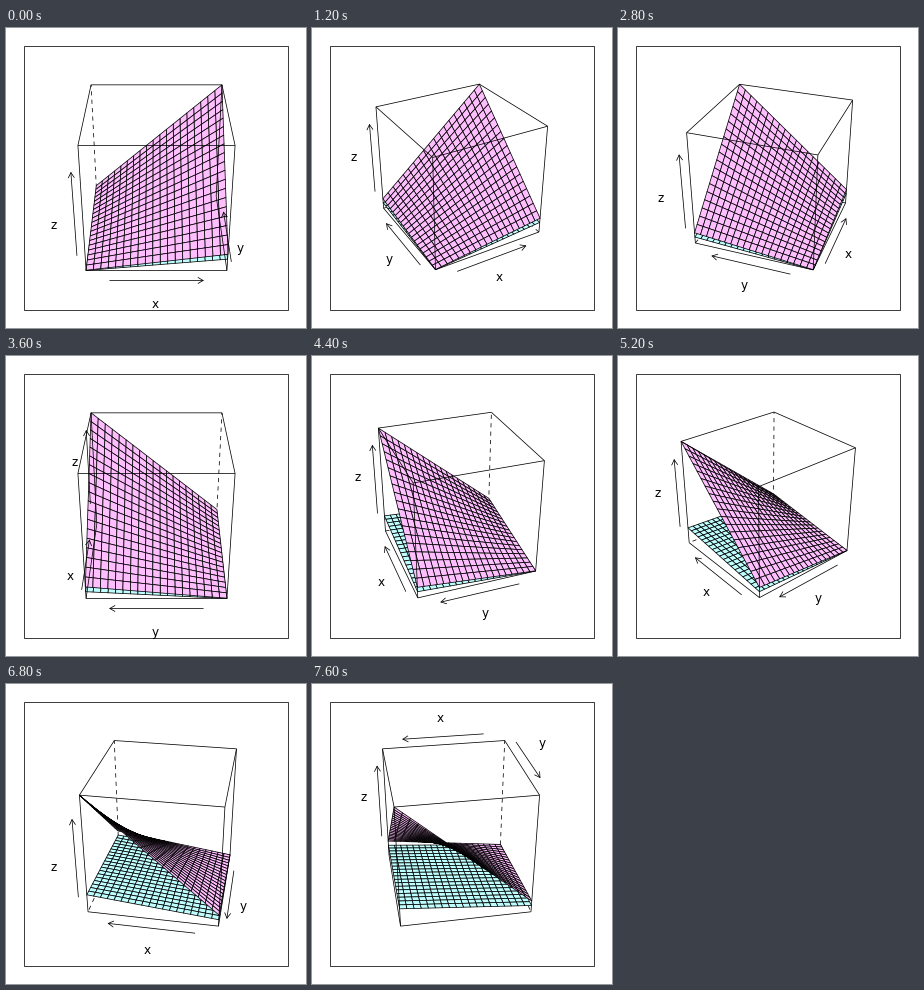
A matplotlib script for the animation above (8000 ms loop, 300 px wide and 300 px high).

```python
import itertools

import matplotlib.pyplot as plt
import numpy as np
from matplotlib.animation import FuncAnimation
from matplotlib.collections import LineCollection, PolyCollection
from matplotlib.patches import Rectangle

SIZE = 300
MIDDLE = 150.5              # centre of the panel
PANEL = 264
PX = 0.72                   # points per pixel at 100 dpi
LINE = 0.75 * PX
EYE = 5.0                   # viewing distance
TILT = np.radians(60)
BOX_SPAN = 185.6            # longest side of the projected box, in pixels
ZOOM = 0.8
STEP_DEG, FRAMES, INTERVAL = 10, 20, 400
CYAN, PINK = "#BFFFFF", "#FFBFFF"

# Two surfaces over a 20 x 20 grid: additive, and with an interaction term
N = 20
gx, gy = np.meshgrid(np.arange(1, N + 1), np.arange(1, N + 1), indexing="ij")
plane = 5.0 * gx + 3.0 * gy
twisted = plane + 2.0 * gx * gy
low, high = plane.min(), twisted.max()


def unit(v, lo, hi):
    return (v - lo) / (hi - lo) - 0.5


GRID_X, GRID_Y = unit(gx, 1, N), unit(gy, 1, N)
SURFACES = [np.stack([GRID_X, GRID_Y, unit(z, low, high)], axis=-1)
            for z in (plane, twisted)]

CORNERS = np.array(list(itertools.product((-0.5, 0.5), repeat=3)))
EDGES = [(a, b) for a, b in itertools.combinations(range(8), 2)
         if np.abs(CORNERS[a] - CORNERS[b]).sum() == 1]

# Hidden floor corner (x, y) -> side signs of the x, y and z axis arrows
# as (y, z), (x, z) and (x, y); ties go to the first entry.
AXIS_SIDES = {
    (-1, 1): ((-1, -1), (1, -1), (-1, -1)),
    (1, -1): ((1, -1), (-1, -1), (1, 1)),
    (1, 1): ((-1, -1), (-1, -1), (-1, 1)),
    (-1, -1): ((-1, 1), (-1, 1), (1, -1)),
}


def turn(points, angle):
    x, y = points[..., 0], points[..., 1]
    c, s = np.cos(angle), np.sin(angle)
    return x * c - y * s, x * s + y * c


def perspective(points, angle):
    x, y = turn(points, angle)
    z = points[..., 2]
    c, s = np.cos(TILT), np.sin(TILT)
    depth = EYE - (z * c - y * s)
    return np.stack([x, y * c + z * s], axis=-1) / depth[..., None]


def make_camera(angle):
    """Return a function from box coordinates to stage pixels."""
    flat = perspective(CORNERS, angle)
    lo, hi = flat.min(axis=0), flat.max(axis=0)
    scale = BOX_SPAN / (hi - lo).max()
    centre = (lo + hi) / 2 / ZOOM

    def camera(points):
        p = (perspective(np.asarray(points, float), angle) - centre) * scale
        return p * (1, -1) + MIDDLE

    return camera


def hidden_corner(angle):
    return max(AXIS_SIDES,
               key=lambda c: round(float(turn(np.array(c), angle)[1]), 6))


def quads(mesh):
    cells = np.stack([mesh[:-1, :-1], mesh[1:, :-1],
                      mesh[1:, 1:], mesh[:-1, 1:]], axis=2)
    return cells.reshape(-1, 4, mesh.shape[-1])


def draw_surfaces(camera, angle):
    x, y = turn(quads(SURFACES[0])[..., :2].mean(axis=1), angle)
    distance = np.hypot(x, y + EYE * np.sin(TILT))
    order = np.argsort(-distance, kind="stable")
    below, above = (quads(camera(s))[order] for s in SURFACES)
    cells = np.stack([below, above], axis=1).reshape(-1, 4, 2)
    ax.add_collection(PolyCollection(
        cells, facecolors=[CYAN, PINK] * len(order), edgecolors="black",
        linewidths=LINE, joinstyle="round", snap=False, zorder=2))


def draw_box(camera, corner):
    flat = camera(CORNERS)
    far = next(i for i, c in enumerate(CORNERS)
               if tuple(c * 2) == (*corner, -1))
    back = [flat[list(e)] for e in EDGES if far in e]
    front = [flat[list(e)] for e in EDGES if far not in e]
    style = dict(colors="black", linewidths=LINE, snap=False)
    ax.add_collection(LineCollection(back, linestyles=[(0, (5.6, 5.6))],
                                     zorder=1, **style))
    ax.add_collection(LineCollection(front, zorder=3, **style))


def draw_arrow(start, tip):
    heading = np.arctan2(*(start - tip)[::-1])
    barbs = [tip + 5.8 * np.array([np.cos(heading + t), np.sin(heading + t)])
             for t in (-np.pi / 6, np.pi / 6)]
    for path in ([start, tip], [barbs[0], tip, barbs[1]]):
        ax.plot(*np.array(path).T, color="black", lw=LINE, snap=False,
                zorder=4)


def draw_axes(camera, corner):
    for axis, sides in enumerate(AXIS_SIDES[corner]):
        def place(along, factor):
            return np.insert(np.array(sides) * 0.5 * factor, axis, along)

        draw_arrow(*camera([place(-0.33, 1.1), place(0.33, 1.1)]))
        x, y = camera(place(0, 4 / 3))
        ax.text(x - 1, y + 4, "xyz"[axis], family="DejaVu Sans",
                size=12 * PX, ha="center", va="baseline", zorder=4)


def draw(frame):
    ax.clear()
    ax.set(xlim=(0, SIZE), ylim=(SIZE, 0))
    ax.axis("off")
    edge = MIDDLE - PANEL / 2
    ax.add_patch(Rectangle((edge, edge), PANEL, PANEL, fill=False,
                           ec="black", lw=LINE, snap=False))
    angle = np.radians(frame * STEP_DEG)
    camera, corner = make_camera(angle), hidden_corner(angle)
    draw_box(camera, corner)
    draw_surfaces(camera, angle)
    draw_axes(camera, corner)
    return []


fig = plt.figure(figsize=(3, 3), dpi=100, facecolor="white")
ax = fig.add_axes([0, 0, 1, 1])
animation = FuncAnimation(fig, draw, frames=FRAMES, interval=INTERVAL,
                          init_func=lambda: [], repeat=True, repeat_delay=0)
plt.show()
```
